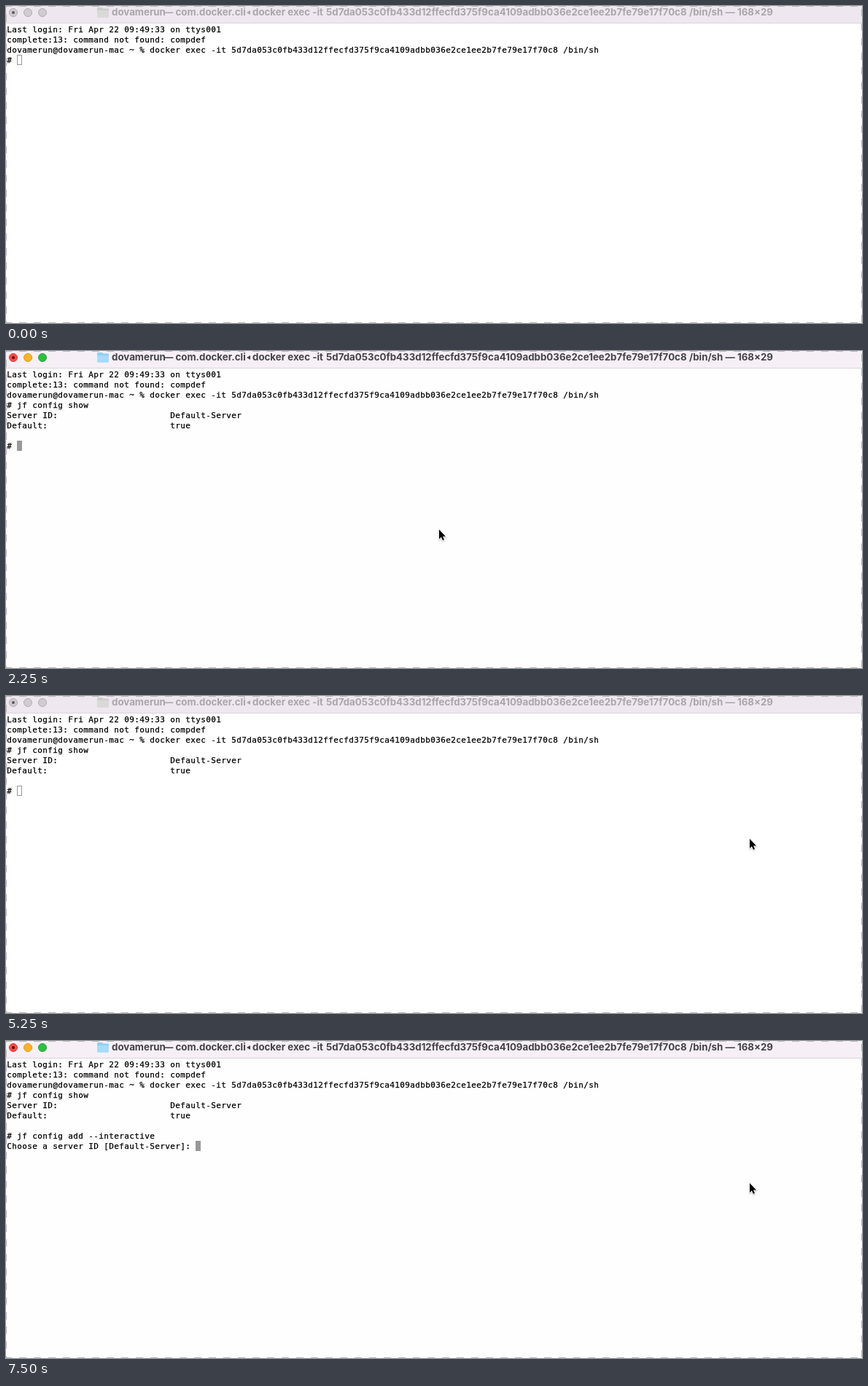
These frames come from a looping animation (1174 px wide and 435 px high, 8000 ms). An HTML page with a canvas:

```html
<!DOCTYPE html>
<html lang="en">
<head>
<meta charset="utf-8">
<title>Terminal session</title>
<style>
  html, body { margin: 0; width: 100%; height: 100%; overflow: hidden; background: #fff; }
  canvas { display: block; }
</style>
</head>
<body>
<canvas id="stage" width="1174" height="435"></canvas>
<script>
const canvas = document.getElementById('stage');
const ctx = canvas.getContext('2d');
const WIDTH = canvas.width, HEIGHT = canvas.height;
const LOOP = 8000;
const CELL = { x: 1, y: 25, w: 7, h: 14, baseline: 11 };

const user = 'dovamerun';
const container = '5d7da053c0fb433d12ffecfd375f9ca4109adbb036e2ce1ee2b7fe79e17f70c8';

const login = [
  'Last login: Fri Apr 22 09:49:33 on ttys001',
  'complete:13: command not found: compdef',
  `${user}@${user}-mac ~ % docker exec -it ${container} /bin/sh`
];
const shown = [
  ...login,
  '# jf config show',
  'Server ID:'.padEnd(32) + 'Default-Server',
  'Default:'.padEnd(32) + 'true',
  ''
];
const addCommand = '# jf config add --interactive';

// Each step changes only the listed parts of the window state.
const steps = [
  { at: 0, active: false, pointer: null, lines: [...login, '# '] },
  { at: 250, pointer: [601, 286] },
  { at: 500, pointer: [594, 246] },
  { at: 750, active: true, pointer: [594, 245] },
  { at: 1500, lines: [...login, '# jf config show'] },
  { at: 2250, lines: [...shown, '# '] },
  { at: 2500, pointer: [844, 122] },
  { at: 2750, pointer: null },
  { at: 3500, active: false },
  { at: 5250, pointer: [1020, 196] },
  { at: 5500, active: true, pointer: [1020, 195] },
  { at: 5750, lines: [...shown, addCommand] },
  { at: 6250, lines: [...shown, addCommand, 'Choose a server ID [Default-Server]: '] }
];

const themes = {
  active: {
    page: '#fefefe', bar: '#f6f0f6', edge: '#d9d4da', title: '#454346',
    lights: ['#fd4b46', '#fdb326', '#2bc13b'], rims: ['#df3d38', '#dd9a20', '#21a52f'],
    dot: '#5c0906', folder: '#8ecff3', folderFront: '#a5dcf8'
  },
  inactive: {
    page: '#ffffff', bar: '#eee7ef', edge: '#dbd5dc', title: '#aaa6ab',
    lights: Array(3).fill('#d1cbd2'), rims: Array(3).fill('#b1abb2'),
    dot: '#5d595e', folder: '#cdcdcd', folderFront: '#d9dad8'
  }
};

function rect(color, x, y, w, h) {
  ctx.fillStyle = color;
  ctx.fillRect(x, y, w, h);
}

function disc(x, y, r, fill, rim) {
  ctx.beginPath();
  ctx.arc(x, y, r, 0, Math.PI * 2);
  ctx.fillStyle = fill;
  ctx.fill();
  if (rim) {
    ctx.strokeStyle = rim;
    ctx.lineWidth = 1;
    ctx.stroke();
  }
}

function polygon(points, x, y) {
  ctx.beginPath();
  points.forEach(([px, py]) => ctx.lineTo(x + px, y + py));
  ctx.closePath();
}

function drawFolder(theme) {
  ctx.fillStyle = theme.folder;
  ctx.beginPath();
  ctx.roundRect(125, 2, 8, 5, 1.5);
  ctx.roundRect(125, 3.5, 16, 12, 1.5);
  ctx.fill();
  ctx.fillStyle = theme.folderFront;
  ctx.beginPath();
  ctx.roundRect(125, 6, 16, 9.5, 1.5);
  ctx.fill();
}

function drawTitleBar(theme) {
  rect(theme.bar, 0, 0, WIDTH, 23);
  rect(theme.edge, 0, 23, WIDTH, 1);
  theme.lights.forEach((color, i) => disc(10 + 20 * i, 9, 5.5, color, theme.rims[i]));
  disc(10, 9, 2, theme.dot);
  drawFolder(theme);

  ctx.font = 'bold 13.3px Inter, sans-serif';
  ctx.textAlign = 'left';
  ctx.fillStyle = theme.title;
  const parts = [
    [user, 145], ['— com.docker.cli', 216], ['docker exec -it', 338],
    [container, 439], ['/bin/sh — 168×29', 937]
  ];
  parts.forEach(([text, x]) => ctx.fillText(text, x, 13));
  polygon([[0, 3], [5, 0], [5, 6]], 330, 6);
  ctx.fill();
}

function drawText(lines) {
  ctx.font = '11px "DejaVu Sans Mono", monospace';
  ctx.textAlign = 'center';
  ctx.fillStyle = ctx.strokeStyle = '#000';
  ctx.lineWidth = 0.25;
  lines.forEach((line, row) => {
    const y = CELL.y + row * CELL.h + CELL.baseline;
    [...line].forEach((char, col) => {
      if (char === ' ') return;
      const x = CELL.x + (col + 0.5) * CELL.w;
      ctx.fillText(char, x, y);
      ctx.strokeText(char, x, y);
    });
  });
}

function drawCaret(lines, active) {
  const row = lines.length - 1;
  const x = CELL.x + lines[row].length * CELL.w;
  const y = CELL.y + row * CELL.h;
  if (active) {
    rect('#999', x, y, CELL.w, CELL.h);
  } else {
    ctx.strokeStyle = '#999';
    ctx.lineWidth = 1;
    ctx.strokeRect(x + 0.5, y + 0.5, CELL.w - 1, CELL.h - 1);
  }
}

function drawBorder() {
  ctx.strokeStyle = '#b9b9b9';
  ctx.lineWidth = 1;
  ctx.setLineDash([10, 10]);
  const line = (x1, y1, x2, y2, offset) => {
    ctx.lineDashOffset = offset;
    ctx.beginPath();
    ctx.moveTo(x1, y1);
    ctx.lineTo(x2, y2);
    ctx.stroke();
  };
  line(0, 0.5, WIDTH, 0.5, 2);
  line(0, HEIGHT - 0.5, WIDTH, HEIGHT - 0.5, 2);
  line(0.5, 0, 0.5, HEIGHT, 8);
  line(WIDTH - 0.5, 0, WIDTH - 0.5, HEIGHT, 16);
  ctx.setLineDash([]);
}

function drawPointer([x, y]) {
  const arrow = [
    [0, 0], [0, 13], [2.9, 10.3], [4.9, 14.8],
    [7, 13.9], [5, 9.5], [9, 9.5]
  ];
  ctx.save();
  ctx.shadowColor = 'rgba(0, 0, 0, 0.3)';
  ctx.shadowBlur = 2;
  ctx.shadowOffsetY = 1;
  polygon(arrow, x, y);
  ctx.strokeStyle = '#fff';
  ctx.lineWidth = 1.5;
  ctx.stroke();
  ctx.restore();
  ctx.fillStyle = '#000';
  ctx.fill();
}

function stateAt(time) {
  return Object.assign({}, ...steps.filter(step => step.at <= time));
}

function draw(time) {
  const { active, pointer, lines } = stateAt(time);
  const theme = active ? themes.active : themes.inactive;
  rect(theme.page, 0, 0, WIDTH, HEIGHT);
  drawTitleBar(theme);
  drawCaret(lines, active);
  drawText(lines);
  drawBorder();
  if (pointer) drawPointer(pointer);
}

const start = performance.now();
function tick() {
  draw((performance.now() - start) % LOOP);
  requestAnimationFrame(tick);
}
tick();
</script>
</body>
</html>
```
